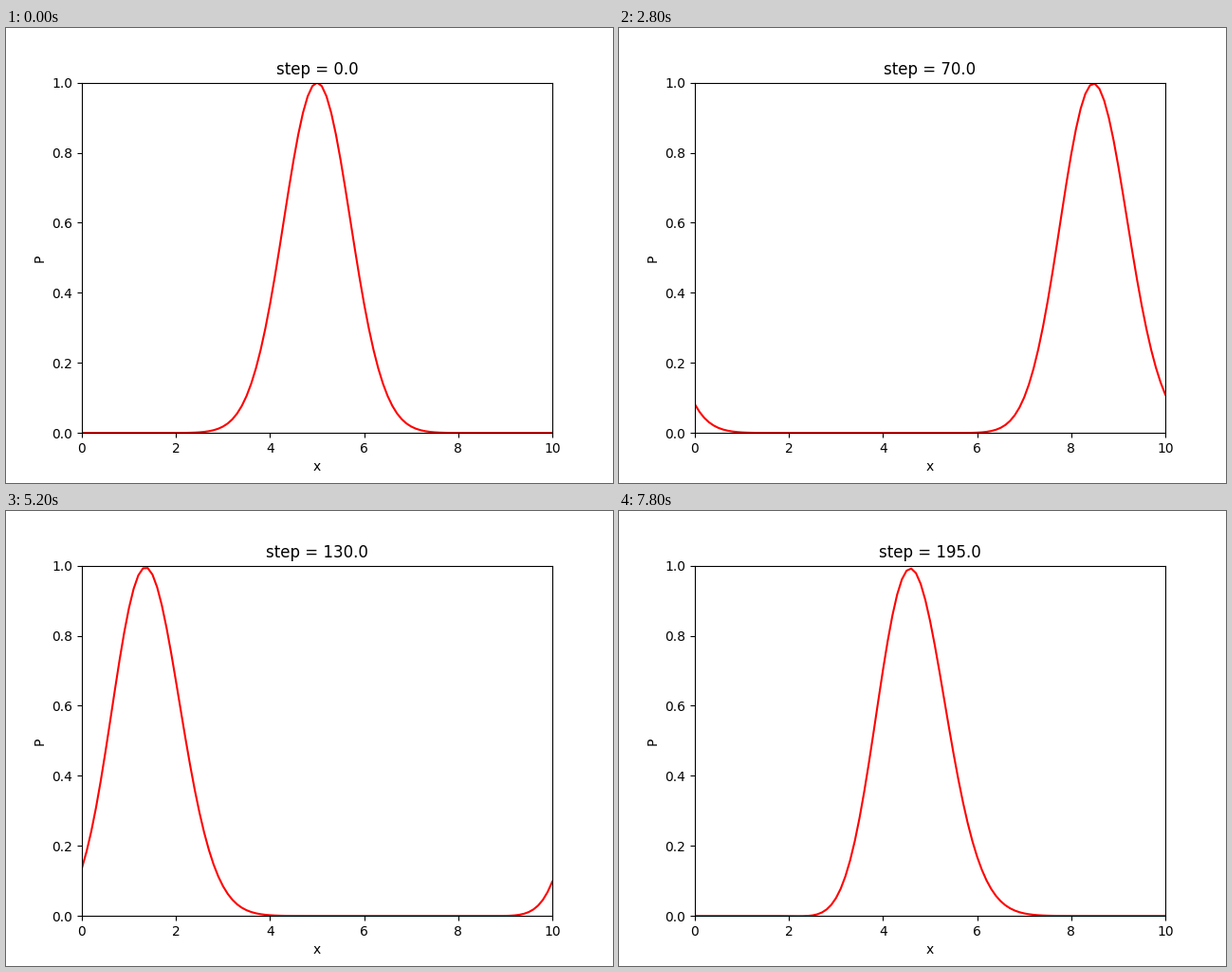
These frames come from a looping animation (640x480 px, 8000 ms). A matplotlib script:

```python
import numpy as np
import matplotlib.pyplot as plt
from matplotlib.animation import FuncAnimation

FRAMES = 40
STEPS_PER_FRAME = 5
DX = 0.1
DT = 0.05
SPEED = 1.0
COURANT = SPEED * DT / DX

x = np.linspace(0, 10, 101)


def advance(p):
    """One Lax-Wendroff step of linear advection on a periodic grid."""
    left, right = np.roll(p, 1), np.roll(p, -1)
    drift = COURANT / 2 * (right - left)
    spread = COURANT**2 / 2 * (right - 2 * p + left)
    return p - drift + spread


def solve():
    p = np.exp(-(x - 5) ** 2)
    states = []
    for _ in range(FRAMES):
        states.append(p)
        for _ in range(STEPS_PER_FRAME):
            p = advance(p)
    return states


states = solve()

plt.rcParams["font.family"] = "DejaVu Sans"
fig, ax = plt.subplots(figsize=(6.4, 4.8), dpi=100)
ax.set_xlim(0, 10)
ax.set_ylim(0, 1)
ax.set_xlabel("x")
ax.set_ylabel("P")
line, = ax.plot(x, states[0], color="red")
title = ax.set_title("step = 0.0")


def update(frame):
    line.set_ydata(states[frame])
    title.set_text(f"step = {frame * STEPS_PER_FRAME:.1f}")
    return line, title


anim = FuncAnimation(fig, update, frames=FRAMES, interval=200,
                     repeat=True, repeat_delay=0, blit=False)
plt.show()
```
